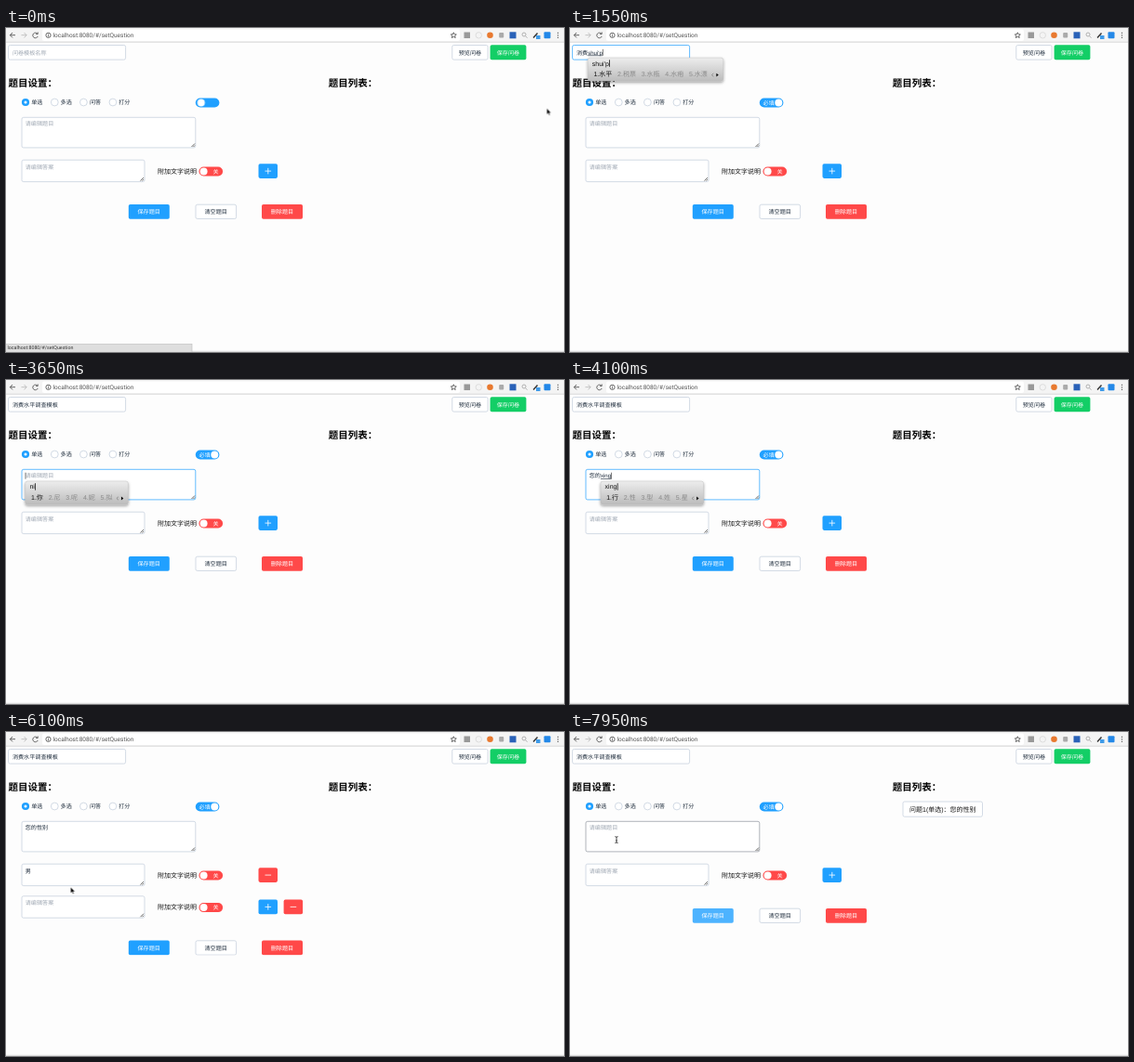
Animation of 600x349 px, one loop 8000 ms. Source, as an HTML page:

```html
<!DOCTYPE html>
<html>
<head>
<meta charset="utf-8">
<title>Survey editor</title>
<style>
html, body { margin: 0; width: 100%; height: 100%; overflow: hidden; background: #fdfdfd; }
svg { display: block; width: 600px; height: 349px; }
text { font: 6.125px "Liberation Sans", "Noto Sans CJK SC", sans-serif; fill: #1f2d3d; white-space: pre; text-rendering: geometricPrecision; }
.big { font-size: 10.5px; font-weight: bold; fill: #000; }
.mid { font-size: 7px; fill: #111; }
.url { font: 6.5px Roboto, sans-serif; fill: #555; }
.w { fill: #fff; font-weight: 500; }
.hint { fill: #a0a9b4; }
.box { fill: #fff; stroke: #c0ccda; stroke-width: .7; }
.blue { fill: #20a0ff; }
.red { fill: #ff4949; }
.line { fill: none; stroke: #555; stroke-width: .9; }
.under { text-decoration: underline; }

/* One percent is 80 ms */
.box, .anim { animation: 8s infinite linear; }
#nameBox { animation-name: focusName; }
#areaBox { animation-name: focusArea; }
#ansBox { animation-name: focusAns; }
#ans2Box { animation-name: focusAns2; }
@keyframes focusName { 0%, 10.7% { stroke: #c0ccda } 12%, 41% { stroke: #20a0ff } 43%, 100% { stroke: #c0ccda } }
@keyframes focusArea { 0%, 41% { stroke: #c0ccda } 43%, 60.1% { stroke: #20a0ff } 62.5%, 97.2% { stroke: #c0ccda } 99%, 100% { stroke: #8f949c } }
@keyframes focusAns { 0%, 60.1% { stroke: #c0ccda } 62.5%, 70.2% { stroke: #20a0ff } 72.5%, 100% { stroke: #c0ccda } }
@keyframes focusAns2 { 0%, 79.2% { stroke: #c0ccda } 81.5%, 100% { stroke: #20a0ff } }

#knob { animation-name: knob; }
@keyframes knob { 0%, .7% { transform: translateX(-14.5px) } 4%, 100% { transform: none } }
#must { animation-name: must; }
@keyframes must { 0%, 1.5% { opacity: 0 } 4.5%, 100% { opacity: 1 } }
#status { animation-name: status; }
@keyframes status { 0%, .8% { opacity: 1 } 3%, 100% { opacity: 0 } }

.two, .one, .done, #acts, #save, #arrow, #beam, #ring, #cur { animation: 8s infinite step-end; }
.two { animation-name: two; }
.one { animation-name: one; }
.done { animation-name: done; }
#acts { animation-name: drop; }
#save { animation-name: hover; }
@keyframes two { 0%, 91.6% { visibility: hidden } 70.6% { visibility: visible } }
@keyframes one { 0%, 91.6% { visibility: visible } 70.6% { visibility: hidden } }
@keyframes done { 0% { visibility: hidden } 91.6% { visibility: visible } }
@keyframes drop { 0%, 91.6% { transform: none } 70.6% { transform: translateY(34.6px) } }
@keyframes hover { 0% { fill: #20a0ff } 90.6% { fill: #4db3ff } }

#pointer { animation: move 8s infinite ease-in-out; }
@keyframes move {
  0%, 1% { transform: translate(581.5px, 86.5px) }
  10%, 35.6% { transform: translate(60px, 27px) }
  39%, 56% { transform: translate(60px, 113px) }
  59.3%, 66% { transform: translate(46.5px, 151.5px) }
  69.8%, 71% { transform: translate(281px, 154px) }
  76%, 76.4% { transform: translate(69.5px, 167px) }
  79%, 85% { transform: translate(60px, 188px) }
  88% { transform: translate(70px, 205px) }
  91%, 92.4% { transform: translate(152px, 231px) }
  98.4%, 100% { transform: translate(50px, 116px) }
}
#cur { animation-name: cur; }
@keyframes cur { 0%, 35.6%, 56%, 66%, 85% { opacity: 1 } 11.9%, 45%, 62.4%, 81.2% { opacity: 0 } }
#arrow { animation-name: arrow; }
#beam { animation-name: beam; }
@keyframes arrow { 0%, 36.6%, 57.8%, 67.6%, 87.2% { visibility: visible } 8.6%, 38.1%, 58.5%, 77.7%, 96.6% { visibility: hidden } }
@keyframes beam { 0%, 36.6%, 57.8%, 67.6%, 87.2% { visibility: hidden } 8.6%, 38.1%, 58.5%, 77.7%, 96.6% { visibility: visible } }
#ring { animation-name: ring; }
@keyframes ring { 0%, 12%, 42.6%, 61.4%, 71.4%, 80.4%, 92.4% { opacity: 0 } 10.6%, 41%, 59.7%, 70%, 79%, 91% { opacity: 1 } }
</style>
</head>
<body>
<svg viewBox="0 0 600 349">
  <defs>
    <linearGradient id="grey" x2="0" y2="1">
      <stop stop-color="#ededed"/><stop offset="1" stop-color="#bcbcbc"/>
    </linearGradient>
    <filter id="shade" x="-10%" y="-20%" width="120%" height="160%">
      <feDropShadow dx="0" dy="1.5" stdDeviation="1.5" flood-opacity=".4"/>
    </filter>
    <path id="grip" class="line" stroke-width=".5" d="M-4.5-1L-1-4.5M-2.5-1L-1-2.5"/>
    <g id="add"><rect class="blue" width="20.5" height="15.6" rx="1.8"/><path d="M7 7.8h6.6M10.3 4.5v6.6" stroke="#fff" stroke-width=".8"/></g>
    <g id="del"><rect class="red" width="20.5" height="15.6" rx="1.8"/><path d="M7 7.8h6.6" stroke="#fff" stroke-width=".8"/></g>
    <g id="note">
      <text class="mid" x="163" y="156.5">附加文字说明</text>
      <rect class="red" x="207.5" y="149.5" width="25.6" height="10" rx="5"/>
      <circle cx="212.6" cy="154.5" r="4" fill="#fff"/>
      <text class="w" x="222.5" y="156.7">关</text>
    </g>
  </defs>

  <!-- browser bar -->
  <rect width="600" height="349" fill="#fdfdfd"/>
  <rect width="600" height="15" fill="#f4f4f4"/>
  <rect x="39" y="1.5" width="449" height="12.5" rx="2" fill="#fff"/>
  <path d="M0 15.2h600M0 348.3h600" stroke="#cfcfcf" stroke-width=".8"/>
  <path class="line" d="M10 7.7H4.5M7 5L4.3 7.7 7 10.4M33.8 6.2A2.8 2.8 0 1 0 34.2 9M34.2 4.5v2h-2"/>
  <path class="line" style="stroke:#bbb" d="M16.5 7.7H22M19.5 5l2.7 2.7-2.7 2.7"/>
  <circle class="line" cx="45.5" cy="7.8" r="2.6" stroke-width=".7"/>
  <path class="line" d="M45.5 7.4v2M45.5 6v.7"/>
  <text class="url" x="50.5" y="10.1">localhost:8080/#/setQuestion</text>
  <path class="line" stroke-width=".6" d="M481.3 4.8l.9 2 2.1.2-1.6 1.4.5 2.1-1.9-1.1-1.9 1.1.5-2.1-1.6-1.4 2.1-.2z"/>
  <rect x="492.5" y="4.5" width="6.5" height="6.5" fill="#999"/>
  <circle cx="508.3" cy="7.8" r="3.2" fill="none" stroke="#ddd"/>
  <circle cx="520.5" cy="7.8" r="3.3" fill="#e8792f"/>
  <rect x="530.2" y="5" width="5" height="5.5" rx="1" fill="#aaa"/>
  <rect x="541.5" y="4.3" width="7" height="7" fill="#2a62b8"/>
  <path class="line" style="stroke:#aaa" d="M558.5 8.7l2 2M559 7a2 2 0 1 1-4 0 2 2 0 0 1 4 0"/>
  <path d="M567 10.5l4.5-5" stroke="#333" stroke-width="1.4"/>
  <rect x="570" y="8" width="4.5" height="4" fill="#3f9be8"/>
  <rect x="578.5" y="4.3" width="7" height="7" rx="1" fill="#2388e8"/>
  <path d="M593.5 4.7v1.2M593.5 7.2v1.2M593.5 9.7v1.2" stroke="#666" stroke-width="1.2"/>

  <!-- page -->
  <rect id="nameBox" class="box" x="2.6" y="18.5" width="126" height="15.6" rx="1.8"/>
  <rect class="box" x="479.8" y="18.5" width="38.3" height="15.6" rx="1.8"/>
  <text x="486.7" y="28.5">预览问卷</text>
  <rect x="520.6" y="18.2" width="38.8" height="16.1" rx="1.8" fill="#13ce66"/>
  <text class="w" x="527.7" y="28.5">保存问卷</text>
  <text class="big" x="2.4" y="62.7">题目设置：</text>
  <text class="big" x="346.8" y="62.7">题目列表：</text>
  <circle class="blue" cx="21" cy="80" r="4.1"/><circle cx="21" cy="80" r="1.5" fill="#fff"/>
  <circle class="box" cx="52.3" cy="80" r="3.9"/><circle class="box" cx="83.4" cy="80" r="3.9"/><circle class="box" cx="114.9" cy="80" r="3.9"/>
  <text x="27.2" y="82.3">单选</text><text x="58.6" y="82.3">多选</text><text x="89.9" y="82.3">问答</text><text x="121.2" y="82.3">打分</text>
  <rect class="blue" x="203.8" y="75.5" width="25.6" height="10" rx="5"/>
  <text id="must" class="w anim" x="207.6" y="82.7">必填</text>
  <circle id="knob" class="anim" cx="224.3" cy="80.5" r="4" fill="#fff"/>

  <rect id="areaBox" class="box" x="17" y="96.3" width="186.8" height="32.6" rx="1.8"/>
  <use href="#grip" x="204" y="129"/>
  <rect id="ansBox" class="box" x="17" y="142.2" width="132" height="23.4" rx="1.8"/>
  <use href="#grip" x="149" y="165.6"/>
  <use href="#note"/>
  <use class="one" href="#add" x="271.5" y="146.3"/>
  <use class="two" href="#del" x="271.5" y="146.3"/>
  <g class="two">
    <rect id="ans2Box" class="box" x="17" y="176.8" width="132" height="23.4" rx="1.8"/>
    <use href="#grip" x="149" y="200.2"/>
    <use href="#note" y="34.6"/>
    <use href="#add" x="271.5" y="180.6"/>
    <use href="#del" x="298.6" y="180.6"/>
  </g>
  <g id="acts">
    <rect id="save" x="131.8" y="190" width="44" height="15.7" rx="1.8"/>
    <text class="w" x="141.5" y="200.1">保存题目</text>
    <rect class="box" x="204" y="190.2" width="43.6" height="15.3" rx="1.8"/>
    <text x="213.5" y="200.1">清空题目</text>
    <rect class="red" x="275" y="190" width="44" height="15.7" rx="1.8"/>
    <text class="w" x="284.7" y="200.1">删除题目</text>
  </g>
  <g class="done">
    <rect class="box" x="358" y="75" width="85.5" height="16.2" rx="1.8"/>
    <text class="mid" x="365" y="85.7">问题1(单选)：您的性别</text>
  </g>

  <g id="fields"></g>
  <rect id="caret" width=".6" height="7" fill="#222"/>

  <g id="ime">
    <rect id="panel" y="3.6" height="25" rx="2.5" fill="url(#grey)" stroke="#b5b5b5" stroke-width=".4" filter="url(#shade)"/>
    <text id="typed" class="mid" x="4.7" y="12"></text>
    <rect id="imeCaret" y="5.8" width=".7" height="7.5"/>
    <text id="cands" class="mid" x="6.3" y="23.6"></text>
    <path id="pages" d="M-10.5 20.4l-2 1.7 2 1.7" fill="none" stroke="#888" stroke-width=".9"/>
    <path id="next" d="M-7.5 20.2l2.4 1.9-2.4 1.9z"/>
  </g>

  <g id="status" class="anim">
    <rect x="-1" y="340.5" width="201" height="9" fill="#dedede" stroke="#bbb" stroke-width=".6"/>
    <text x="1.5" y="346.3" style="font:5.3px Roboto,sans-serif;fill:#333">localhost:8080/#/setQuestion</text>
  </g>
  <g id="pointer">
    <g id="cur">
      <path id="arrow" d="M0 0v6.6l1.5-1.3 1 2.3 1.1-.5-1-2.2h2z" fill="#000" stroke="#fff" stroke-width=".5"/>
      <path id="beam" d="M-1.6-3.4q1.6 0 1.6 1 0-1 1.6-1M0-2.6v5.4M-1.6 3.6q1.6 0 1.6-1 0 1 1.6 1M-.8.9h1.6" fill="none" stroke="#222" stroke-width=".8"/>
    </g>
    <circle id="ring" r="7.3" fill="none" stroke="#222" stroke-width="1"/>
  </g>
</svg>
<script>
const LOOP = 8000;
const $ = id => document.getElementById(id);

const svg = (tag, parent, cls = '') => {
  const el = document.createElementNS('http://www.w3.org/2000/svg', tag);
  if (cls) el.setAttribute('class', cls);
  return parent.appendChild(el);
};
const attr = (el, values) => {
  for (const key in values) el.setAttribute(key, values[key]);
};

// x, baseline, placeholder, focus start and end
const fields = {
  name: [6.9, 28.5, '问卷模板名称', 860, 3290],
  area: [20.7, 105.4, '请编辑题目', 3290, 4800],
  ans: [20.7, 151.5, '请编辑答案', 4800, 5620],
  ans2: [20.7, 186.1, '请编辑答案', 6330, 7330]
};

const XIAO = '消费 小 笑 校 效', SHUI = '水 谁 睡 税 说', PING = '水平 税票 水瓶 水疱 水漂';
const DIAO = '调 掉 吊 雕 钓', CHA = '调查 掉车 吊车 吊床 调成', MO = '模(mú)板 末班 膜拜 魔板 mois';
const NI = '你 尼 呢 妮 拟', NIN = '您 恁 拰 你 呢', DE = '的 得 地 德 底';
const XING = '行 性 型 姓 星', BIE = '性别 星币 型别 行波 姓别', NAN = '男 难 南 楠 喃', NV = '女 钕 衄 恧 朒';

// time, field, committed text, pinyin, candidates, placeholder still up
const steps = [
  [0, 'name', ''],
  [950, 'name', '', 'x', '想 下 小 向 学'], [1000, 'name', '', 'xi', '系 西 洗 喜 细'],
  [1100, 'name', '', 'xiao', XIAO], [1150, 'name', '', "xiao'f", XIAO],
  [1250, 'name', '消费'], [1300, 'name', '消费', 'sh', '是 上 时 说 谁'], [1400, 'name', '消费', 'shui', SHUI],
  [1550, 'name', '消费', "shui'p", PING], [1600, 'name', '消费', "shui'pin", PING], [1650, 'name', '消费', "shui'ping", PING],
  [1750, 'name', '消费水平'], [1800, 'name', '消费水平', 'd', DE], [1850, 'name', '消费水平', 'di', '第 地 低 底 帝'],
  [1900, 'name', '消费水平', 'diao', DIAO], [2000, 'name', '消费水平', "diao'c", CHA], [2100, 'name', '消费水平', "diao'cha", CHA],
  [2200, 'name', '消费水平调查'], [2350, 'name', '消费水平调查', 'm', '吗 没 们 嘛 买'],
  [2400, 'name', '消费水平调查', 'mo', '摸 磨 莫 末 墨'], [2450, 'name', '消费水平调查', "mo'b", MO],
  [2550, 'name', '消费水平调查', "mo'ban", MO], [2650, 'name', '消费水平调查模板'],
  [3600, 'area', '', 'n', NI, true], [3650, 'area', '', 'ni', NI, true], [3700, 'area', '', 'nin', NIN],
  [3800, 'area', '您'], [3850, 'area', '您', 'd', DE], [3900, 'area', '您', 'de', DE], [4000, 'area', '您的'],
  [4050, 'area', '您的', 'x', '想 下 小 向 学'], [4100, 'area', '您的', 'xing', XING],
  [4200, 'area', '您的', "xing'b", BIE], [4300, 'area', '您的', "xing'bie", BIE], [4450, 'area', '您的性别'],
  [5000, 'ans', '', 'n', NI], [5050, 'ans', '', 'na', '那 拿 哪 呐 娜'], [5100, 'ans', '', 'nan', NAN], [5250, 'ans', '男'],
  [6500, 'ans2', '', 'n', NI], [6550, 'ans2', '', 'nv', NV], [6700, 'ans2', '女'],
  [7330, 'ans2', ''], [7330, 'ans', ''], [7330, 'area', '']
];

const parts = {};
for (const id in fields) {
  const [x, y, hint] = fields[id];
  const group = svg('g', $('fields'), id === 'ans2' ? 'two' : '');
  const placeholder = svg('text', group, 'hint');
  placeholder.textContent = hint;
  const value = svg('text', group);
  attr(placeholder, { x, y });
  attr(value, { x, y });
  parts[id] = { placeholder, done: svg('tspan', value), comp: svg('tspan', value, 'under') };
}

function showIme(id, pinyin, list) {
  $('ime').style.display = pinyin ? '' : 'none';
  if (!pinyin) return;
  const [x, y] = fields[id];
  const left = x + parts[id].done.getComputedTextLength();
  attr($('ime'), { transform: `translate(${left} ${y})` });
  $('typed').textContent = pinyin;
  attr($('imeCaret'), { x: 5 + $('typed').getComputedTextLength() });
  const cands = $('cands');
  cands.textContent = '';
  list.split(' ').forEach((word, i) => {
    const span = svg('tspan', cands);
    span.textContent = `${i + 1}.${word}`;
    if (i) attr(span, { dx: 5.8, fill: '#8a8a8a', style: 'fill:#8a8a8a' });
  });
  const box = cands.getBBox();
  const width = box.x + box.width + 17;
  attr($('panel'), { width });
  for (const id of ['pages', 'next']) attr($(id), { transform: `translate(${width} 0)` });
}

function apply(count) {
  const text = {};
  for (let i = 0; i < count; i++) text[steps[i][1]] = steps[i];
  const last = steps[count - 1];
  for (const id in fields) {
    const [, , done = '', pinyin = '', , late] = text[id] || [];
    const comp = late ? '' : pinyin;
    parts[id].done.textContent = done;
    parts[id].comp.textContent = comp;
    parts[id].placeholder.style.display = done + comp ? 'none' : '';
  }
  showIme(last[1], last[3], last[4]);
}

function drawCaret(t, since) {
  const id = Object.keys(fields).find(key => t >= fields[key][3] && t < fields[key][4]);
  const from = id ? Math.max(since, fields[id][3]) : 0;
  const on = id && (t - from) % 1000 < 500;
  $('caret').style.display = on ? '' : 'none';
  if (!on) return;
  const { done, comp } = parts[id];
  const width = done.getComputedTextLength() + comp.getComputedTextLength();
  attr($('caret'), { x: fields[id][0] + width, y: fields[id][1] - 5.7 });
}

let start, shown;
function frame(now) {
  start ??= now;
  const t = (now - start) % LOOP;
  const count = steps.filter(step => step[0] <= t).length;
  if (count !== shown) apply(shown = count);
  drawCaret(t, steps[count - 1][0]);
  requestAnimationFrame(frame);
}
requestAnimationFrame(frame);
</script>
</body>
</html>
```
